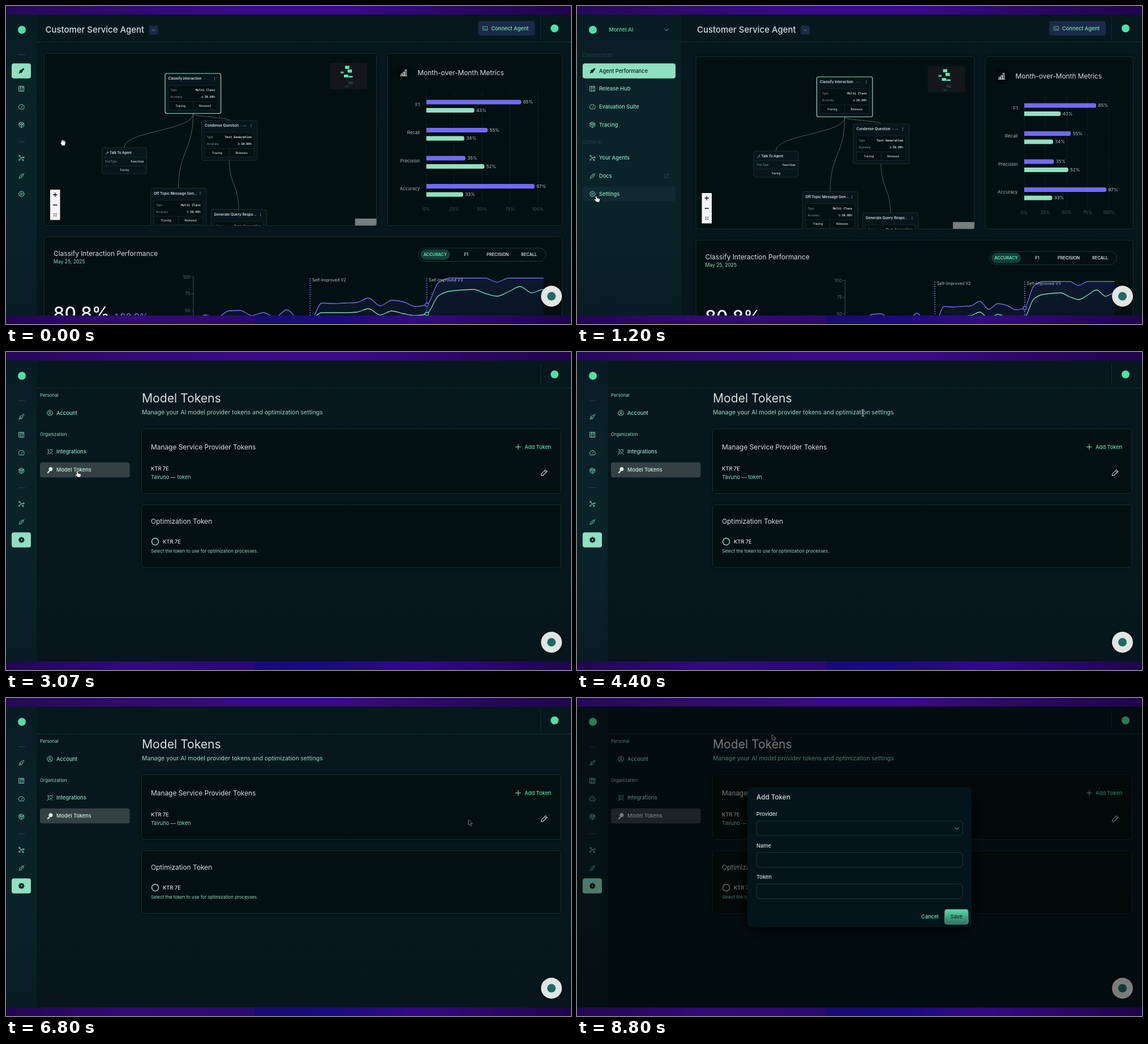
An HTML page with a canvas that plays this animation: 998x561 px, repeating every 9.14 s.

```html
<!DOCTYPE html>
<html lang="en">
<head>
<meta charset="utf-8">
<title>Agent dashboard</title>
<style>
html, body { margin: 0; width: 998px; height: 561px; overflow: hidden; background: #06161c; }
canvas { display: block; width: 998px; height: 561px; }
</style>
</head>
<body>
<canvas id="stage"></canvas>
<script>
const LOOP = 9140;
const MINT = '#8fdfc0', GREEN = '#4fe0a5', PURPLE = '#716bf8', WHITE = '#d5dfdd', CARD = '#021011', LINE = '#153032';
const SANS = 'Inter, "Open Sans", sans-serif', MONO = '"DejaVu Sans Mono", monospace';
const canvas = document.getElementById('stage'), c = canvas.getContext('2d');
const dpr = window.devicePixelRatio || 1;
canvas.width = 998 * dpr;
canvas.height = 561 * dpr;

const lerp = (a, b, k) => a + (b - a) * k;
const ease = (t, a, b) => { const k = Math.min(1, Math.max(0, (t - a) / (b - a))); return k * k * (3 - 2 * k); };
const ring = (x, y, r) => `M${x - r} ${y}a${r} ${r} 0 1 0 ${2 * r} 0a${r} ${r} 0 1 0 ${-2 * r} 0`;
const gear = Array.from({ length: 32 }, (_, i) => {
  const r = i % 4 < 2 ? 10.5 : 8, a = i * Math.PI / 16;
  return (i ? 'L' : 'M') + (12 + r * Math.cos(a)).toFixed(1) + ' ' + (12 + r * Math.sin(a)).toFixed(1);
}).join('') + 'z';

// Icons are drawn in a 24 unit box.
const ICONS = {
  rocket: 'M9 15l-4-1 3-5h4c2-4 5-6 9-6 0 4-2 7-6 9v4l-5 3zM6 16c-2 1-3 5-3 5s4-1 5-3',
  hub: 'M3 3h18v18H3zM8 3v18M8 8h3l4 4v9M15 3v5h6',
  gauge: 'M4 19a10 10 0 1 1 16 0zM12 14l4-5',
  cube: 'M12 2l9 5v10l-9 5-9-5V7zM3 7l9 5 9-5M12 12v10M7.5 4.5l9 5v5M7.5 9.500v5',
  nodes: ring(5, 4.5, 2.5) + ring(20, 10, 2.5) + ring(4.5, 19, 2.5) + ring(18, 20, 2.5) + 'M6.500 6.500l4 5 7-1M10.500 11.500l-4.500 6M10.500 11.500l6 7',
  plug: 'M2 22l4-4M18 6l4-4M6 18a4 4 0 0 1 0-6l2-2 6 6-2 2a4 4 0 0 1-6 0zM18 6a4 4 0 0 0-6 0l-1.500 1.500 6 6L18 12a4 4 0 0 0 0-6z',
  link: 'M8 8l8 8M8 8c-3 2-4 5-1 9 4 3 7 2 9-1M7 17l-5 5M11 5c3-2 6-1 8 2 2 2 2 5 0 7M18 6l4-4M4 5l3 1M5 2l2 3M19 19l3 2',
  gear: gear + ring(12, 12, 3.5),
  account: ring(12, 12, 10) + ring(12, 10, 3.5) + 'M6 19c1-5 11-5 12 0',
  person: ring(12, 8, 6) + 'M3 22c1-10 17-10 18 0',
  key: ring(15, 9, 6.5) + 'M10.500 13.500L3 21v2h4v-3h3v-3l3-2' + ring(17, 7, 1),
  pencil: 'M3 21l1-6L16 3l5 5L9 20zM13 6l5 5',
  chevron: 'M5 9l7 7 7-7',
  open: 'M11 4H4v16h16v-7M14 3h7v7M21 3l-9 9',
  terminal: 'M2 4h20v16H2zM6 9l3 3-3 3M12 15h5',
  bars: 'M2 21h20M4 21v-6h4v6M10 21V10h4v11M16 21V3h4v18',
  expand: 'M4 9V4h5M15 4h5v5M20 15v5h-5M9 20H4v-5M4 4l5 5M20 4l-5 5M20 20l-5-5M4 20l5-5',
  wrench: 'M3 19l9-9a6 6 0 0 1 8-7l-4 4 1 3 3 1 3-4a6 6 0 0 1-8 7l-9 8z'
};
const POINTERS = {
  arrow: ['M0 0V10.500l2.500-2.300 1.800 4 1.700-.8-1.700-3.800h3.500z', '#0b0f10', '#f2f2f2'],
  hand: ['M-1.500-2c1-.8 1.800 0 2 1l.6 2.200 4 .8c1 .3 1.200 1 1 2l-.8 3.500H.5L-2.800 4c-.6-1 .4-1.600 1.300-.8L-.6 4z', '#f7f7f7', '#111'],
  grab: ['M-2 5L-4.500.5c-.4-1 .7-1.500 1.300-.7l.8 1-1-3.800c-.1-1 1-1.200 1.300-.3l.8 2.600-.2-3.300c0-1 1.300-1 1.400 0l.4 3.200.7-2.800c.3-.9 1.400-.6 1.300.3l-.3 3.300.8-1.500c.5-.8 1.500-.3 1.200.6L2.800 5z', '#f7f7f7', '#111']
};

const text = (s, x, y, size, color = WHITE, { w = 400, align = 'left', font = SANS } = {}) => {
  c.font = `${w} ${size}px ${font}`;
  c.textAlign = align;
  c.fillStyle = color;
  c.fillText(s, x, y + size * .36);
};
const box = (x, y, w, h, r, fill, stroke, lw = 1) => {
  c.beginPath();
  c.roundRect(x, y, w, h, r);
  if (fill) { c.fillStyle = fill; c.fill(); }
  if (stroke) { c.strokeStyle = stroke; c.lineWidth = lw; c.stroke(); }
};
const line = (color, lw, ...p) => {
  c.beginPath();
  for (let i = 0; i < p.length; i += 2) c.lineTo(p[i], p[i + 1]);
  c.strokeStyle = color;
  c.lineWidth = lw;
  c.stroke();
};
const dot = (x, y, r, fill, stroke, lw = 1) => box(x - r, y - r, 2 * r, 2 * r, r, fill, stroke, lw);
const icon = (name, x, y, size, color, fill) => {
  const p = new Path2D(ICONS[name]);
  c.save();
  c.translate(x - size / 2, y - size / 2);
  c.scale(size / 24, size / 24);
  c.lineWidth = 1.8;
  c.lineJoin = c.lineCap = 'round';
  c.strokeStyle = c.fillStyle = color;
  if (fill) c.fill(p, 'evenodd');
  c.stroke(p);
  c.restore();
};
const card = (x, y, r, b) => {
  c.shadowColor = 'rgba(0,0,0,.45)';
  c.shadowBlur = 9 * dpr;
  box(x, y, r - x, b - y, 4, CARD);
  c.shadowColor = 'transparent';
  box(x, y, r - x, b - y, 4, null, LINE);
};
const gradient = (x0, y0, x1, y1, ...colors) => {
  const g = c.createLinearGradient(x0, y0, x1, y1);
  colors.forEach((col, i) => g.addColorStop(i / (colors.length - 1), col));
  return g;
};

// ---- timeline ----
const PATH = [[0, 101, 241], [130, 101, 241], [850, 34, 338], [1930, 34, 338], [2200, 169, 287], [2700, 126, 213],
  [3270, 126, 213], [4100, 505, 107], [4600, 505, 107], [5070, 817, 215], [6800, 817, 215], [7350, 938, 168], [7750, 938, 168], [8700, 344.5, 65]];
const pointerAt = t => {
  const i = PATH.findIndex(p => p[0] > t);
  if (i < 0) return PATH.at(-1).slice(1);
  const [t0, x0, y0] = PATH[i - 1], [t1, x1, y1] = PATH[i], k = ease(t, t0, t1);
  return [lerp(x0, x1, k), lerp(y0, y1, k)];
};
const pageAt = t => t < 1480 ? 'dash' : t < 2900 ? 'account' : 'tokens';

// ---- sidebar ----
const ITEMS = [['rocket', 'Agent Performance', 114.5], ['hub', 'Release Hub', 146], ['gauge', 'Evaluation Suite', 178], ['cube', 'Tracing', 209.5],
  ['nodes', 'Your Agents', 268], ['plug', 'Docs', 300], ['gear', 'Settings', 331.5]];
function sidebar(e, page, mx, my) {
  const w = 54.5 + 129.5 * e, pill = 34 + 130 * e;
  c.save();
  c.beginPath();
  c.rect(0, 15, w, 531);
  c.clip();
  c.fillStyle = gradient(0, 15, 0, 546, '#081b23', '#0a2329', '#0a2329', '#081c23');
  c.fillRect(0, 15, w, 531);
  dot(28, 42, 7, GREEN);
  c.globalAlpha = e;
  text('Mornel.AI', 56.5, 42, 9.24, GREEN, { w: 500 });
  icon('chevron', 158, 42, 11, MINT);
  text('Dashboards', 10, 86.5, 9.24, '#283c43');
  text('General', 10, 240, 9.24, '#283c43');
  c.globalAlpha = 1 - e;
  for (const y of [86, 239.5]) line('#29434a', 1, 21, y, 34, y);
  c.globalAlpha = 1;
  for (const [name, label, y] of ITEMS) {
    const active = label === (page === 'dash' ? 'Agent Performance' : 'Settings');
    const hover = mx < w && Math.abs(my - y) < 13.3;
    if (active) box(10, y - 13.3, pill, 26.6, 4, MINT);
    else if (hover) box(10, y - 13.3, pill, 26.6, 4, '#112930');
    const color = active ? '#06211f' : MINT;
    icon(name, 27.3, y, 11.5, color, active);
    c.globalAlpha = e;
    text(label, 39, y, 9.24, color, { w: 500 });
    if (label === 'Docs') icon('open', 158, y, 9, '#35544f');
    c.globalAlpha = 1;
  }
  c.restore();
}

// ---- dashboard ----
function node(x, y, title, kind, tail, selected) {
  box(x, y, 98.5, 70.5, 3, '#06161b', selected ? MINT : '#22363c', selected ? 1.2 : .8);
  text(title, x + 5.5, y + 9, 6.3, WHITE, { w: 600 });
  if (tail) text(tail, x + 69, y + 9, 6, '#9fb0b0');
  for (const d of [-2, 0, 2]) dot(x + 87.5, y + 9 + d, .55, WHITE);
  box(x + 5.5, y + 21, 87, 43.5, 2, CARD, '#1d3136', .7);
  line('#1d3136', .7, x + 5.5, y + 49.5, x + 92.5, y + 49.5);
  line('#1d3136', .7, x + 49, y + 49.5, x + 49, y + 64.5);
  text('Type', x + 9.5, y + 29.5, 4.7, '#93a5a6');
  text('Accuracy', x + 9.5, y + 41.5, 4.7, '#93a5a6');
  const mono = { w: 700, align: 'right', font: MONO };
  text(kind, x + 88.5, y + 29.5, 5.28, WHITE, mono);
  text('30.00%', x + 88.5, y + 41.5, 5.28, WHITE, mono);
  for (const d of [-1.3, 0, 1.3]) line('#9fb0b0', .6, x + 64, y + 41.5 + d, x + 67.5, y + 41.5 + d);
  text('Tracing', x + 27.5, y + 57, 4.95, WHITE, { w: 500, align: 'center' });
  text('Releases', x + 70.5, y + 57, 4.95, WHITE, { w: 500, align: 'center' });
}
function edge(x0, y0, x1, y1) {
  const m = (y0 + y1) / 2;
  c.beginPath();
  c.moveTo(x0, y0);
  c.bezierCurveTo(x0, m, x1, m, x1, y1);
  c.strokeStyle = '#63736f';
  c.lineWidth = .8;
  c.stroke();
}
function flow(x, r) {
  card(x, 83.5, r, 387.5);
  c.save();
  c.beginPath();
  c.roundRect(x, 83.5, r - x, 304, 4);
  c.clip();
  c.fillStyle = '#08201f';
  for (let gx = x + 8; gx < r; gx += 9.9) for (let gy = 90; gy < 388; gy += 9.9) c.fillRect(gx, gy, .8, .8);
  c.save();
  c.translate(x - 67, 0);
  edge(330, 190, 208.5, 250);
  edge(330, 190, 394, 202);
  edge(330, 190, 304, 322);
  edge(394, 272, 410.5, 359);
  node(280.5, 119, 'Classify Interaction', 'Multi Class', '- ...', true);
  node(345, 202, 'Condense Question', 'Text Generation', '- —');
  node(255, 321.5, 'Off Topic Message Gen...', 'Multi Class');
  node(361.5, 359, 'Generate Query Respo...', 'Text Generation');
  box(169, 250, 79, 46, 3, '#06161b', '#22363c', .8);
  icon('wrench', 178, 259, 5.5, WHITE);
  text('Talk To Agent', 182.5, 259, 5.9, WHITE, { w: 600 });
  line('#1d3136', .7, 169, 266.5, 248, 266.5);
  line('#1d3136', .7, 169, 282, 248, 282);
  text('Tool Type', 174.5, 274, 4.5, '#93a5a6');
  text('Function', 243, 274, 4.8, WHITE, { w: 700, align: 'right', font: MONO });
  text('Tracing', 208.5, 289, 4.5, WHITE, { w: 500, align: 'center' });
  box(77.5, 324, 17.5, 53.5, 0, '#f4f6f6');
  line('#111', 1.3, 82.5, 333, 90, 333);
  line('#111', 1.3, 86.2, 329.3, 86.2, 336.7);
  line('#111', 1.3, 82.5, 351, 90, 351);
  icon('expand', 86.2, 368.5, 7, '#111');
  c.restore();
  c.translate(r - 654, 0);
  box(571.5, 100.5, 66, 46, 0, '#13171a');
  [[598.5, 105.5, 7.5, 5.5], [603, 112, 7.5, 5.5], [590.5, 115.5, 5.5, 3.5, '#5fa48d'], [596.5, 121, 7.5, 5], [604.5, 123.5, 7.5, 2.5],
    [604.5, 133, 7.5, 5, '#1c3a36'], [599, 140.5, 5.5, 3, '#1c3a36']].forEach(([a, b, w, h, f]) => box(a, b, w, h, 0, f || '#62e5b3'));
  box(616, 375, 38.5, 12.5, 0, '#737b7b');
  text('React Flow', 651.5, 381, 6.2, '#868d8d', { align: 'right' });
  c.restore();
}
function metrics(x) {
  card(x, 83.5, 982.5, 387.5);
  dot(x + 29, 118, 14, '#010b0c');
  icon('bars', x + 29, 118, 14, WHITE);
  text('Month-over-Month Metrics', x + 53.5, 118, 11.92);
  const left = x + 69, span = 939.5 - left;
  c.setLineDash([2, 2.6]);
  for (let i = 0; i < 5; i++) line('#1b3033', .9, left + span * i / 4, 152, left + span * i / 4, 347);
  c.setLineDash([]);
  for (let i = 0; i < 5; i++) text(i * 25 + '%', left + span * i / 4, 358.5, 7.92, '#46585b', { align: 'center' });
  [['F1', 85, 43], ['Recall', 55, 34], ['Precision', 35, 52], ['Accuracy', 97, 33]].forEach(([name, ...values], i) => {
    const y = 174 + 49.5 * i;
    text(name, left - 11.5, y, 7.92, '#a9b6b6', { align: 'right' });
    values.forEach((v, j) => {
      const by = y - 4.5 + 14.5 * j, w = span * v / 100;
      box(left, by - 4, w, 8, [0, 3, 3, 0], j ? '#92dfc1' : PURPLE);
      text(v + '%', left + w + 3.5, by, 7.92, '#b9c5c5');
    });
  });
}
const TOP = [556, 545, 550, 538, 537, 546, 541, 549, 536, 552, 556, 524, 525, 524, 523, 515, 529, 519, 522, 530, 527,
  488, 480, 480, 480, 480, 487, 480, 480, 480, 480];
const LOW = [552, 541, 541, 541, 540, 534, 545, 538, 543, 546, 543, 511, 503, 501, 500, 507, 512, 504, 495, 506, 500];
function curve(ys, x, dx) {
  const slope = i => {
    const a = ys[i] - ys[i - 1], b = ys[i + 1] - ys[i];
    return a * b > 0 ? 2 * a * b / (a + b) : 0;
  };
  c.beginPath();
  c.moveTo(x, ys[0]);
  for (let i = 1; i < ys.length; i++) {
    const end = x + dx * i;
    c.bezierCurveTo(end - dx * 2 / 3, ys[i - 1] + slope(i - 1) / 3, end - dx / 3, ys[i] - slope(i) / 3, end, ys[i]);
  }
}
function performanceCard(x) {
  card(x, 407, 982.5, 600);
  text('Classify Interaction Performance', x + 16.5, 437, 11.92);
  text('May 25, 2025', x + 16.5, 450.5, 8.58, MINT);
  text('80.8%', x + 16, 541.5, 31.7, '#eef3f2', { w: 500 });
  text('98.9%', x + 134, 548, 15.84, PURPLE, { w: 500 });
  line(PURPLE, 1.1, x + 123.5, 549, x + 129, 543.5);
  line(PURPLE, 1.1, x + 125, 543.5, x + 129, 543.5, x + 129, 547.5);
  box(728.5, 427, 225, 23.5, 12, null, '#1b3a3a');
  box(732, 429.5, 52, 18, 9, '#12403a');
  [['ACCURACY', 758], ['F1', 813], ['PRECISION', 868.5], ['RECALL', 924]].forEach(([s, cx], i) =>
    text(s, cx, 438.5, 7.26, i ? WHITE : '#6be8b9', { w: 600, align: 'center' }));

  const ax = x + 263.5, dx = (949.5 - ax) / 30;
  line('#3d4c4e', 1, ax, 478, ax, 600);
  [100, 75, 50].forEach((v, i) => {
    const y = 478 + 29.6 * i;
    line('#3d4c4e', 1, ax - 4, y, ax, y);
    text(v, ax - 5.5, y, 7.92, '#5d6c6d', { align: 'right' });
  });
  curve(TOP, ax, dx);
  c.lineTo(949.5, 600);
  c.lineTo(ax, 600);
  c.fillStyle = gradient(0, 478, 0, 560, 'rgba(75,80,220,.15)', 'rgba(75,80,220,.07)');
  c.fill();
  c.lineWidth = 1.3;
  c.strokeStyle = PURPLE;
  curve(TOP, ax, dx);
  c.stroke();
  c.strokeStyle = '#6fe0b4';
  curve(LOW, ax + 10 * dx, dx);
  c.stroke();
  [2, 3].forEach((v, i) => {
    const vx = ax + dx * 10 * (i + 1);
    c.setLineDash([2, 2]);
    line(PURPLE, 1.5, vx, 480, vx, 560);
    c.setLineDash([]);
    text('Self-Improved V' + v, vx + 3.5, 483.5, 7.26, '#b4c0c1');
    dot(vx, TOP[10 * (i + 1)], 3, CARD, PURPLE, 1.3);
    dot(vx, LOW[10 * i], 3, CARD, '#6fe0b4', 1.3);
  });
}
function dashboard(e) {
  const x = lerp(67.5, 210, e);
  text('Customer Service Agent', x + 2, 42, 14.95, WHITE, { w: 500 });
  box(x + 185, 34.5, 16, 16, 3, '#1b2946');
  icon('chevron', x + 193, 42.5, 8.5, MINT);
  box(834, 26.5, 100, 25.5, 4, '#1a2a47');
  icon('terminal', 846.5, 39.5, 9.5, '#74e4bd');
  text('Connect Agent', 857, 39.5, 9.24, '#74e4bd', { w: 500 });
  c.save();
  c.translate(0, 6 * e);
  flow(x, lerp(654.5, 702, e));
  metrics(lerp(673.5, 721, e));
  performanceCard(x);
  c.restore();
}

// ---- settings ----
const NAV = [['account', 'Account', 107.5], ['link', 'Integrations', 176], ['key', 'Model Tokens', 208]];
function settingsNav(active) {
  text('Personal', 60, 76.5, 7.92, MINT);
  text('Organization', 60, 145.5, 7.92, MINT);
  for (const [name, label, y] of NAV) {
    const on = label === active;
    if (on) box(60, y - 13.3, 158.5, 26.6, 4, '#334144');
    icon(name, 77.5, y, 11.5, on ? '#dcefe8' : MINT, on && name === 'key');
    text(label, 89, y, 9.24, on ? '#cdeee1' : MINT, { w: 500 });
  }
}
const field = (x, y, w, h = 26.5) => box(x, y, w, h, 5, null, '#1b3036');
function accountPage(e) {
  const r = lerp(979.5, 842.5, e), inner = r - 16, half = (inner - 266.5) / 2;
  settingsNav('Account');
  text('Account', 240, 81, 21.12);
  card(239.5, 114.5, r, 402.5);
  dot(268.5, 148.5, 14, '#010b0c');
  icon('person', 268.5, 148.5, 12.5, WHITE);
  text('Basic details', 293, 148.5, 11.92);
  [['First Name', 'Plovanta', 256], ['Last Name', 'Demo', 266.5 + half]].forEach(([label, hint, x]) => {
    text(label, x, 190, 9.24, WHITE, { w: 500 });
    field(x, 201.5, half);
    text(hint, x + 8, 214.5, 10.56, '#2b3c3f');
  });
  text('Update Password', 256, 266, 11.92);
  text('New Password', 256, 301, 9.24, WHITE, { w: 500 });
  field(256, 312, inner - 256);
  text('Cancel', r - 104.5, 378.5, 9.24, WHITE, { w: 500, align: 'right' });
  box(r - 94, 365.5, 83, 26, 4, '#041417');
  text('Save changes', r - 21.5, 378.5, 9.24, '#445254', { w: 500, align: 'right' });
  card(239.5, 423.5, r, 600);
  dot(268.5, 457.5, 14, '#010b0c');
  icon('account', 268.5, 457.5, 13, WHITE);
  text('Privacy', 293, 457.5, 11.92);
  text('Make contact info public', 256, 500, 10.4, WHITE, { w: 500 });
  text('Means that anyone viewing your profile will be able to see your contacts details.', 256, 521, 9.24, MINT);
}
function tokensPage() {
  settingsNav('Model Tokens');
  text('Model Tokens', 240, 81, 21.12);
  text('Manage your AI model provider tokens and optimization settings', 240, 106.5, 10.53, MINT);
  card(239.5, 135.5, 980, 249.5);
  text('Manage Service Provider Tokens', 256, 167.5, 11.9);
  line(MINT, 1, 900, 167.5, 909.5, 167.5);
  line(MINT, 1, 904.8, 162.7, 904.8, 172.3);
  text('Add Token', 916, 167.5, 9.24, GREEN, { w: 500 });
  text('KTR 7E', 256, 206, 9.24, WHITE, { w: 500 });
  text('Tavuno — token', 256, 220.5, 9.24, MINT);
  icon('pencil', 950.5, 213, 14, WHITE);
  card(239.5, 269.5, 980, 380);
  text('Optimization Token', 256, 298.5, 11.9);
  dot(263.5, 334.5, 6, null, MINT, 1.5);
  text('KTR 7E', 277, 334.5, 9.24, WHITE, { w: 500 });
  text('Select the token to use for optimization processes.', 256, 351.5, 7.92, MINT);
}
function modal() {
  c.shadowColor = 'rgba(0,0,0,.6)';
  c.shadowBlur = 22 * dpr;
  c.shadowOffsetY = 8 * dpr;
  box(301, 157, 396, 247, 6, '#03151a');
  c.shadowColor = 'transparent';
  c.shadowOffsetY = 0;
  text('Add Token', 317, 175, 11.7, WHITE, { w: 500 });
  ['Provider', 'Name', 'Token'].forEach((s, i) => {
    text(s, 317, 205 + 55.5 * i, 9.24, WHITE, { w: 500 });
    box(317, 217 + 55.5 * i, 364, 26, 5, null, '#1c3540');
  });
  icon('chevron', 671, 230, 11, WHITE);
  text('Cancel', 608, 386, 9.24, '#6be8b9', { w: 500 });
  box(649.5, 373, 41.5, 26, 4, gradient(0, 373, 0, 399, '#5bdcab', '#2f6f60'), '#5b9c8a');
  text('Save', 670.3, 386, 9.24, '#0a2a25', { w: 500, align: 'center' });
}

// ---- pointer ----
function pointer(x, y, page, sideWidth) {
  const inside = (x0, y0, x1, y1) => x > x0 && x < x1 && y > y0 && y < y1;
  if (page === 'tokens' && inside(240, 100, 561, 114)) {
    line('#111', 2.4, x, y - 5, x, y + 6);
    line('#c4cccc', 1.2, x, y - 5, x, y + 6);
    for (const d of [-5, 6]) line('#c4cccc', 1, x - 2.5, y + d, x + 2.5, y + d);
    return;
  }
  const onNav = page !== 'dash' && inside(60, 94, 218, 222) && NAV.some(n => Math.abs(n[2] - y) < 13.3);
  const kind = x < sideWidth || onNav || (page === 'tokens' && inside(893, 158, 970, 178)) ? 'hand'
    : page === 'dash' ? 'grab' : 'arrow';
  const [d, fill, stroke] = POINTERS[kind], p = new Path2D(d);
  c.save();
  c.translate(x, y);
  if (kind === 'arrow') c.scale(.85, .85);
  c.lineJoin = 'round';
  c.lineWidth = 1;
  c.fillStyle = fill;
  c.strokeStyle = stroke;
  c.stroke(p);
  c.fill(p);
  c.restore();
}

function draw(t) {
  const e = ease(t, 420, 680) - ease(t, 2240, 2480), page = pageAt(t), [mx, my] = pointerAt(t);
  const sideWidth = 54.5 + 129.5 * e, shade = ease(t, 7580, 7800);
  c.setTransform(dpr, 0, 0, dpr, 0, 0);
  c.fillStyle = gradient(0, 0, 998, 0, '#25085a', '#310a72', '#380a86', '#3a0a88', '#2a0768', '#20054c');
  c.fillRect(0, 0, 998, 15);
  c.fillStyle = gradient(0, 0, 440, 0, '#21074f', '#330a77', '#2b0a70');
  c.fillRect(0, 546, 440, 15);
  c.fillStyle = gradient(440, 0, 998, 0, '#170c70', '#1c0a80', '#330a84', '#2a0768', '#1d0549');
  c.fillRect(440, 546, 558, 15);
  c.save();
  c.beginPath();
  c.rect(0, 15, 998, 531);
  c.clip();
  c.fillStyle = gradient(0, 15, 0, 546, '#06171e', '#06181d', '#06161c');
  c.fillRect(0, 15, 998, 531);
  if (page === 'dash') dashboard(e);
  else {
    c.save();
    c.translate(140 * e, 6 * e);
    if (page === 'account') accountPage(e);
    else tokensPage();
    c.restore();
  }
  line('#173039', 1, sideWidth, 63.5, 998, 63.5);
  line('#173039', 1, 944.5, 20, 944.5, 58);
  dot(969, 39.5, 7, GREEN);
  sidebar(e, page, mx, my);
  c.shadowColor = 'rgba(0,0,0,.5)';
  c.shadowBlur = 8 * dpr;
  dot(963.5, 512, 18.5, '#e1e5e3');
  c.shadowColor = 'transparent';
  dot(963.5, 512, 7.5, '#1c6a60');
  if (shade) {
    c.fillStyle = `rgba(0,0,0,${.46 * shade})`;
    c.fillRect(0, 15, 998, 531);
    c.globalAlpha = shade;
    modal();
    c.globalAlpha = 1;
  }
  pointer(mx, my, page, sideWidth);
  c.restore();
}

function tick() {
  draw(performance.now() % LOOP);
  requestAnimationFrame(tick);
}
tick();
</script>
</body>
</html>
```
